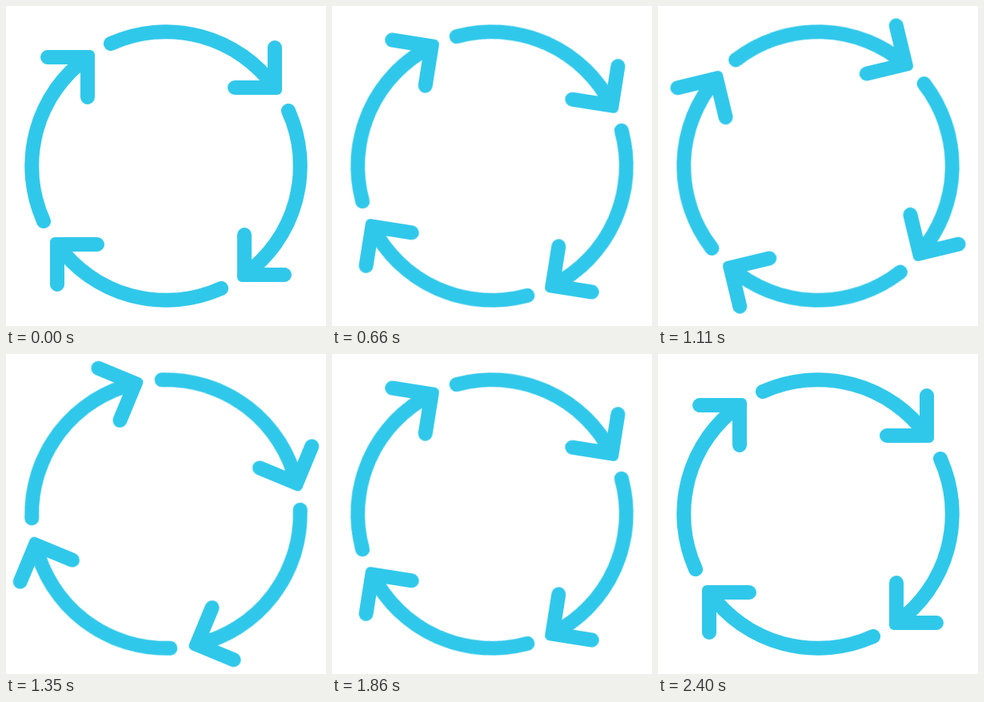
Recreate the animation shown at these times as an HTML page. Size 400 by 400 pixels, loop 2430 ms.

```html
<!DOCTYPE html>
<html lang="en">
<head>
<meta charset="utf-8">
<title>Cycle arrows</title>
<style>
  html, body {
    margin: 0;
    width: 100%;
    height: 100%;
    overflow: hidden;
    background: #fff;
  }
  svg {
    display: block;
    width: 100vw;
    height: 100vh;
  }
  .ring {
    fill: none;
    stroke: #30c8ea;
    stroke-width: 18;
    stroke-linecap: round;
    stroke-linejoin: round;
    transform-origin: 200px 200px;
    /* 81 poses, 4.5deg apart; the tiny lead keeps ticks off the step edges */
    animation: turn 2430ms steps(81, jump-none) -1ms infinite;
  }
  .corner {
    fill: #30c8ea;
    stroke: none;
  }
  @keyframes turn {
    from { transform: rotate(0deg); }
    to { transform: rotate(360deg); }
  }
</style>
</head>
<body>
<svg viewBox="0 0 400 400">
  <defs>
    <g id="arrow">
      <path d="M131 47A167.5 167.5 0 0 1 336 102"/>
      <path d="M336 52V102H286"/>
      <rect class="corner" x="327" y="93" width="18" height="18" rx="6"/>
    </g>
  </defs>
  <g class="ring">
    <use href="#arrow"/>
    <use href="#arrow" transform="rotate(90 200 200)"/>
    <use href="#arrow" transform="rotate(180 200 200)"/>
    <use href="#arrow" transform="rotate(270 200 200)"/>
  </g>
</svg>
</body>
</html>
```
